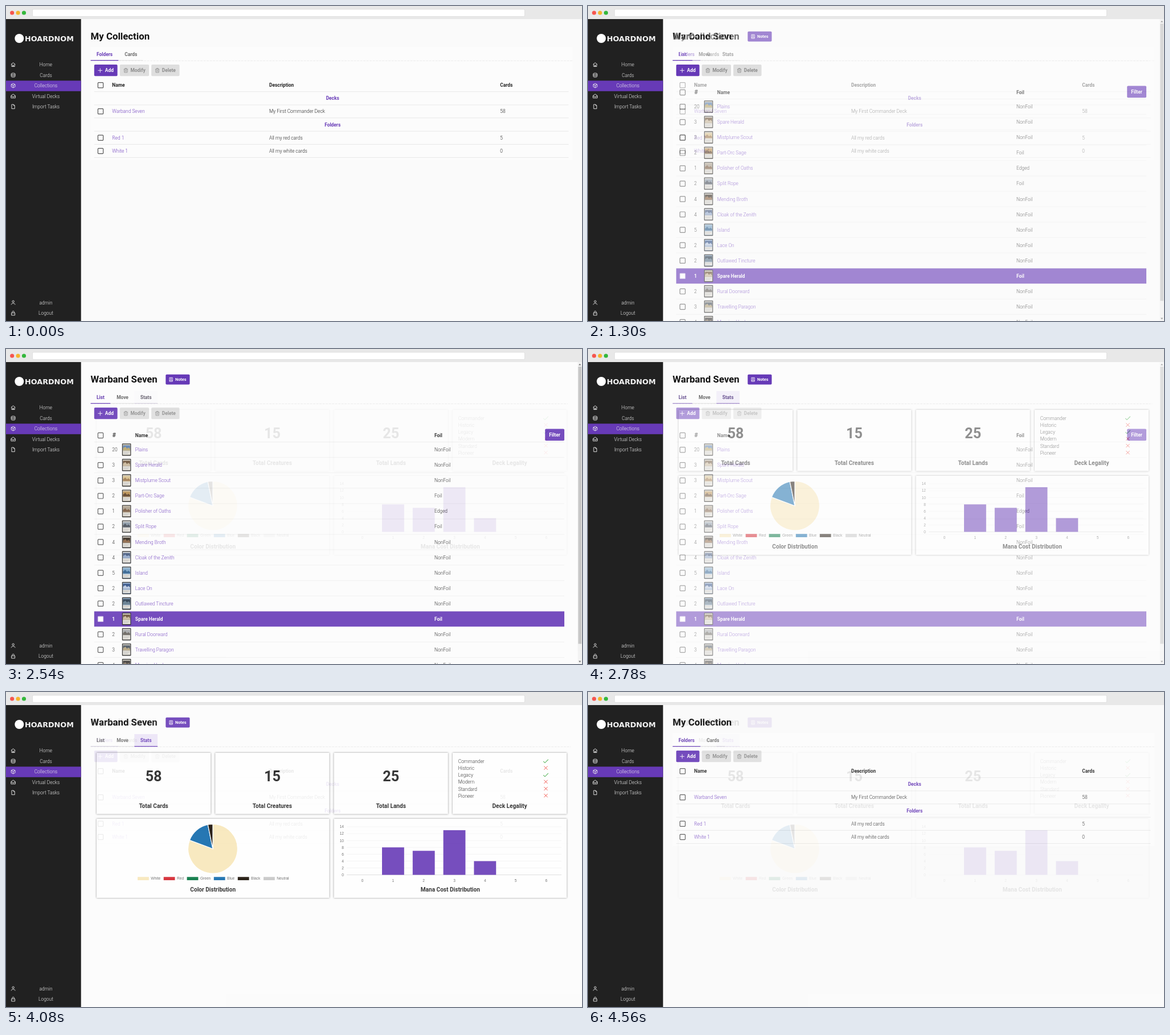
Recreate the animation shown at these times as an HTML page. Size 1011 by 554 pixels, loop 4.62 s.

```html
<!DOCTYPE html>
<html lang="en">
<head>
<meta charset="utf-8">
<title>Card collection tour</title>
<style>
  html, body { margin: 0; width: 100%; height: 100%; overflow: hidden; background: #fafafa; }
  svg { display: block; width: 1011px; height: 554px; }
  text { font-family: Roboto, sans-serif; white-space: pre; }
  .chart { font-family: "Liberation Sans", Arial, sans-serif; }
  .brand { font-family: "DejaVu Sans", sans-serif; }
  .card { filter: drop-shadow(0 .6px 1.8px rgba(0, 0, 0, .5)); }
</style>
</head>
<body>
<svg id="stage" viewBox="0 0 1011 554" xmlns="http://www.w3.org/2000/svg"></svg>
<script>
const VIOLET = '#673ab7', LINK = '#7040bf', INK = '#222', GREY = '#6c6c6c';
const LOOP = 4620, BODY = 8.4;
const DECK = 'Warband Seven';

const ICONS = {
  home: 'M2 11 12 3l10 8M5 9V21h14V9M10 21v-6h4v6',
  stack: 'M3 6a9 3.5 0 0 0 18 0a9 3.5 0 0 0-18 0v12a9 3.5 0 0 0 18 0V6M3 12a9 3.5 0 0 0 18 0',
  box: 'M12 2l9 4.5v11L12 22l-9-4.5v-11zM3 6.5l9 4.5l9-4.5M12 11v11',
  inbox: 'M2 10 12 3l10 7v11H2zM2 13h6l2 3h4l2-3h6',
  file: 'M5 2h9l5 5v15H5zM14 2v5h5',
  user: 'M7.5 7a4.5 4.5 0 0 0 9 0a4.5 4.5 0 0 0-9 0M3 22c0-9 18-9 18 0',
  lock: 'M4 11h16v11H4zM7.5 11V7a4.5 4.5 0 0 1 9 0v4',
  trash: 'M2 6h20M8 6V2h8v4M4 6l1 16h14l1-16M10 11v6M14 11v6',
  book: 'M4 2h16v20H4zM8 7h8M8 11h8M4 17h16',
  plus: 'M12 1v22M1 12h22',
  check: 'M1 13l7 7L23 5',
  cross: 'M3 3l18 18M21 3L3 21'
};

// Text is placed by the middle of its capitals.
function text(x, y, str, o = {}) {
  const { size = BODY, weight = 300, fill = INK, anchor = 'start', cls = '' } = o;
  return `<text x="${x}" y="${y + size * .355}" font-size="${size}" font-weight="${weight}"
    fill="${fill}" text-anchor="${anchor}" class="${cls}">${str}</text>`;
}
const bold = (x, y, str, fill = INK, o = {}) => text(x, y, str, { weight: 700, fill, ...o });
const rect = (x, y, w, h, fill, extra = '') =>
  `<rect x="${x}" y="${y}" width="${w}" height="${h}" fill="${fill}" ${extra}/>`;
const rule = (x1, x2, y, color = '#e9e9e9', w = .8, extra = '') =>
  `<path d="M${x1} ${y}H${x2}" stroke="${color}" stroke-width="${w}" ${extra}/>`;
const icon = (name, x, y, color, size = 9, w = 2.4) =>
  `<path d="${ICONS[name]}" transform="translate(${x - size / 2} ${y - size / 2}) scale(${size / 24})"
    fill="none" stroke="${color}" stroke-width="${w}"/>`;
const checkbox = (y, fill = 'none', stroke = '#555') =>
  rect(161.4, y - 4.6, 9.2, 9.2, fill, `rx="1" stroke="${stroke}" stroke-width="1.2"`);
const button = (x, y, w, h, fill) => rect(x, y, w, h, fill, 'rx="1.8"');

function windowBar() {
  const dots = ['#f6564f', '#f5b52c', '#34b83c'];
  return rect(0, 0, 1011, 23, '#e8e8e8') +
    rect(46.5, 5.8, 864, 12.6, '#fff', 'rx="2" stroke="#d6d6d6" stroke-width=".7"') +
    dots.map((c, i) => `<circle cx="${10.7 + i * 10.4}" cy="12" r="3.6" fill="${c}"/>`).join('');
}

function sidebar() {
  const items = [
    ['home', 'Home', 103.5], ['stack', 'Cards', 122], ['box', 'Collections', 140.4],
    ['inbox', 'Virtual Decks', 158.8], ['file', 'Import Tasks', 177.3],
    ['user', 'admin', 522], ['lock', 'Logout', 540.5]
  ];
  return rect(0, 23, 131.7, 531, '#212121') +
    rect(0, 131.3, 131.7, 18.5, VIOLET) +
    '<circle cx="23.3" cy="57" r="8" fill="#fff"/>' +
    text(33, 57.8, 'HOARDNOM', { size: 12.8, weight: 700, fill: '#f2f2f2', cls: 'brand' }) +
    items.map(([name, label, y]) => icon(name, 12.6, y - .4, '#eee') +
      text(70, y, label, { anchor: 'middle', fill: '#eee' })).join('');
}

const page = bg => rect(131.7, 23, 879.3, 531, bg);

const title = str => bold(148.6, 53, str, '#111', { size: 16.8 });

function deckTitle() {
  return title(DECK) + button(280.3, 44.8, 42.2, 17.8, VIOLET) +
    icon('book', 289.6, 53.7, '#fff', 8) + bold(297, 53.8, 'Notes', '#fff', { size: 7.35 });
}

// tabs: [label, left edge, right edge]
function tabBar(tabs, active, right, tint) {
  return rule(148.6, right, 96.3, '#e6e6e6', .8, 'stroke-dasharray="4 1.5"') +
    tabs.map(([label, a, b], i) => {
      const on = i === active;
      return (on && tint ? rect(a, 74, b - a, 22, tint) : '') +
        rule(a, b, 95.6, on ? VIOLET : '#dcdcdc', on ? 1.4 : .8) +
        bold((a + b) / 2, 84.9, label, on ? VIOLET : GREY, { anchor: 'middle' });
    }).join('');
}

function toolbar() {
  return button(154.8, 103, 40.8, 20.2, VIOLET) + icon('plus', 165.3, 113.3, '#fff', 8.4) +
    bold(173.8, 113.2, 'Add', '#fff') +
    [[199.8, 51.2, 'Modify'], [255.1, 49.4, 'Delete']].map(([x, w, label]) =>
      button(x, 103, w, 20.2, '#dedede') + icon('trash', x + 10.5, 113.3, '#8c8c8c', 8.6) +
      bold(x + 18.7, 113.2, label, '#8c8c8c')).join('');
}

function foldersPage() {
  const rows = [
    [185.3, DECK, 'My First Commander Deck', 58],
    [231.7, 'Red 1', 'All my red cards', 5],
    [255, 'White 1', 'All my white cards', 0]
  ];
  const group = (y, label) => bold(573.2, y, label, VIOLET, { anchor: 'middle' });
  return page('#fafafa') + rect(148.6, 72, 845.4, 199.5, '#fcfcfc') + title('My Collection') +
    tabBar([['Folders', 148.6, 197.4], ['Cards', 198, 240.5]], 0, 994) + toolbar() +
    checkbox(139.3) + bold(186.3, 139.2, 'Name') + bold(462, 139.2, 'Description') +
    bold(867.3, 139.2, 'Cards') +
    [150.6, 173.9, 196.8, 220.2, 243.4, 266.5].map(y => rule(154.8, 987.5, y, '#e4e4e4')).join('') +
    group(162.2, 'Decks') + group(208.6, 'Folders') +
    rows.map(([y, name, note, n]) => checkbox(y) + text(186.3, y, name, { fill: LINK }) +
      text(462, y, note) + text(867.3, y, n)).join('');
}

// Tiny trading card: sky, ground and a text box.
function thumb(y, sky, ground, frame) {
  return rect(203.8, y - 10.8, 15.6, 21.6, '#1c1c1c', 'rx=".8"') +
    rect(204.9, y - 9.6, 13.4, 19, frame) +
    rect(205.4, y - 7.6, 12.4, 8.8, sky) +
    `<path d="M205.4 ${y + 1.2}v-3.4l4-3 3 3.4 2.4-2 3 2.6v2.4z" fill="${ground}"/>` +
    rect(205.4, y + 3, 12.4, 5.6, '#e4e1da') +
    rule(206.4, 216.4, y + 4.8, '#aaa', .6) + rule(206.4, 214.4, y + 6.6, '#aaa', .6);
}

function listPage() {
  const rows = [
    [20, 'Plains', 'NonFoil', '#5b7fae', '#b9a56a', '#c9c4b2'],
    [3, 'Spare Herald', 'NonFoil', '#6b5238', '#c9b79a', '#cfc9bd'],
    [3, 'Mistplume Scout', 'NonFoil', '#d8c08c', '#a07a50', '#d6cfbe'],
    [2, 'Part-Orc Sage', 'Foil', '#b98e4f', '#5d4026', '#c8bda8'],
    [1, 'Polisher of Oaths', 'Edged', '#a99d8c', '#7a5a40', '#c4b9a6'],
    [2, 'Split Rope', 'Foil', '#8795a4', '#484f5a', '#d2d2d0'],
    [4, 'Mending Broth', 'NonFoil', '#33281f', '#8c6443', '#c9c4bb'],
    [4, 'Cloak of the Zenith', 'NonFoil', '#44587e', '#93a9cb', '#cfd3d8'],
    [5, 'Island', 'NonFoil', '#7ba4c6', '#2d5f8d', '#9db9cf'],
    [2, 'Lace On', 'NonFoil', '#2f4f86', '#b9c8df', '#8ba5c6'],
    [2, 'Outlawed Tincture', 'NonFoil', '#25374a', '#60798c', '#7b95ad'],
    [1, 'Spare Herald', 'Foil', '#6b5238', '#c9b79a', '#cfc9bd'],
    [2, 'Rural Doorward', 'NonFoil', '#a3a6a8', '#66625c', '#cbc9c3'],
    [3, 'Travelling Paragon', 'NonFoil', '#4b5560', '#b3a27e', '#c9c7c0'],
    [4, 'Morning Hauler', 'NonFoil', '#3d3a38', '#877663', '#c6c2b9']
  ];
  const list = rows.map(([n, name, foil, ...tones], i) => {
    const y = 177.2 + i * 27.06, on = i === 11;
    const style = on ? { weight: 700, fill: '#fff' } : {};
    return (on ? rect(154.8, y - 13.4, 825.2, 26.8, VIOLET) : rule(154.8, 980, y + 13.5, '#ececec')) +
      (on ? checkbox(y, '#fff', '#c9b8e6') : checkbox(y)) +
      text(186.3, y, n, style) + thumb(y - .2, ...tones) +
      text(226.8, y, name, { fill: LINK, ...style }) + text(752, y, foil, style);
  }).join('');
  const scrollbar = rect(1003.6, 23, 7.4, 531, '#f1f1f1') + rect(1004.4, 31, 5.8, 487.5, '#c1c1c1') +
    '<path d="M1005 28.4l2.2-2.6 2.2 2.6zM1005 548.6l2.2 2.6 2.2-2.6z" fill="#6a6a6a"/>';
  return page('#fcfcfc') + deckTitle() +
    tabBar([['List', 148.6, 183.3], ['Move', 184, 225], ['Stats', 225.3, 266]], 0, 986) + toolbar() +
    checkbox(152) + bold(186.6, 151.2, '#', '#333', { size: 11 }) + bold(226.8, 151.8, 'Name') +
    bold(752, 151.8, 'Foil') + button(946.2, 140.4, 33.8, 20.8, VIOLET) +
    bold(963, 151, 'Filter', '#fff', { anchor: 'middle' }) +
    rule(154.8, 980, 163.6) + list + scrollbar;
}

function pie(cx, cy, r, slices) {
  const total = slices.reduce((sum, s) => sum + s[0], 0);
  const at = a => `${cx + r * Math.sin(a)} ${cy - r * Math.cos(a)}`;
  let a = 0;
  return slices.map(([n, fill]) => {
    const b = a + n / total * Math.PI * 2;
    const d = `M${cx} ${cy}L${at(a)}A${r} ${r} 0 ${b - a > Math.PI ? 1 : 0} 1 ${at(b)}Z`;
    a = b;
    return `<path d="${d}" fill="${fill}" stroke="#fff" stroke-width="1.2"/>`;
  }).join('');
}

function barChart(values) {
  const base = 321.6, unit = 6.04, step = 53.8;
  const label = (x, y, str, anchor) =>
    text(x, y, str, { size: 6.6, weight: 400, fill: '#666', anchor, cls: 'chart' });
  let out = '';
  for (let v = 0; v <= 14; v += 2) {
    const y = base - v * unit;
    out += rule(598, 975, y, v ? '#efefef' : '#cfcfcf', .7) + label(593, y, v, 'end');
  }
  return out + values.map((v, i) => {
    const x = 625.6 + i * step;
    return rect(x - 19.4, base - v * unit, 38.8, v * unit, VIOLET) + label(x, 331.2, i, 'middle');
  }).join('');
}

function statsPage() {
  const card = (x, y, w, h, label) => rect(x, y, w, h, '#fefefe', 'class="card"') +
    bold(x + w / 2, y + h - 14.5, label, INK, { size: 10.08, anchor: 'middle' });
  const totals = [[58, 'Total Cards'], [15, 'Total Creatures'], [25, 'Total Lands']];
  const formats = [['Commander', 1], ['Historic', 0], ['Legacy', 1], ['Modern', 0],
    ['Standard', 0], ['Pioneer', 0]];
  const legend = [['White', '#f8e7b9', 231], ['Red', '#d3202a', 276.7], ['Green', '#00733e', 317.6],
    ['Blue', '#0e68ab', 364.8], ['Black', '#150b00', 406.8], ['Neutral', '#c6c6c6', 452]];
  return page('#fcfcfc') + deckTitle() +
    tabBar([['List', 148.6, 183.3], ['Move', 184, 225], ['Stats', 225.3, 266]], 2, 991, '#ebe5f6') +
    totals.map(([n, label], i) => card(159 + i * 208.3, 107, 200.2, 107.6, label) +
      bold(259.1 + i * 208.3, 148, n, INK, { size: 25.2, anchor: 'middle' })).join('') +
    card(783.9, 107, 200.2, 107.6, 'Deck Legality') +
    formats.map(([name, ok], i) => {
      const y = 122 + i * 12.15;
      return text(793.7, y, name) +
        icon(ok ? 'check' : 'cross', 947.5, y - .6, ok ? '#4caf50' : '#f03a30', ok ? 9.4 : 8.2, 2.8);
    }).join('') +
    card(159, 223, 408.5, 139, 'Color Distribution') +
    pie(363, 275.7, 43.4, [[25, '#f8e7b9'], [5, '#0e68ab'], [1, '#150b00']]) +
    legend.map(([name, fill, x]) => rect(x, 325.3, 19.8, 5.7, fill) +
      text(x + 23.3, 328, name, { size: 6.6, weight: 400, fill: '#666', cls: 'chart' })).join('') +
    card(575.6, 223, 408.5, 139, 'Mana Cost Distribution') +
    barChart([0, 8, 7, 13, 4, 0, 0]);
}

document.getElementById('stage').innerHTML =
  `<g>${foldersPage()}</g><g id="list">${listPage()}</g><g id="stats">${statsPage()}</g>` +
  windowBar() + sidebar();

// Cross-fades advance in tenths; everything else holds.
function fade(id, steps) {
  const frames = steps.map(([time, opacity, easing = 'step-end']) =>
    ({ offset: time / LOOP, opacity, easing }));
  document.getElementById(id).animate(frames, { duration: LOOP, iterations: Infinity });
}
const TENTHS = 'steps(9, end)';
fade('list', [[0, 0], [1000, .1, TENTHS], [1540, 1], [3080, 0], [LOOP, 0]]);
fade('stats', [[0, 0], [2540, .1, TENTHS], [3080, 1], [4080, .9, TENTHS], [LOOP, 0]]);
</script>
</body>
</html>
```
